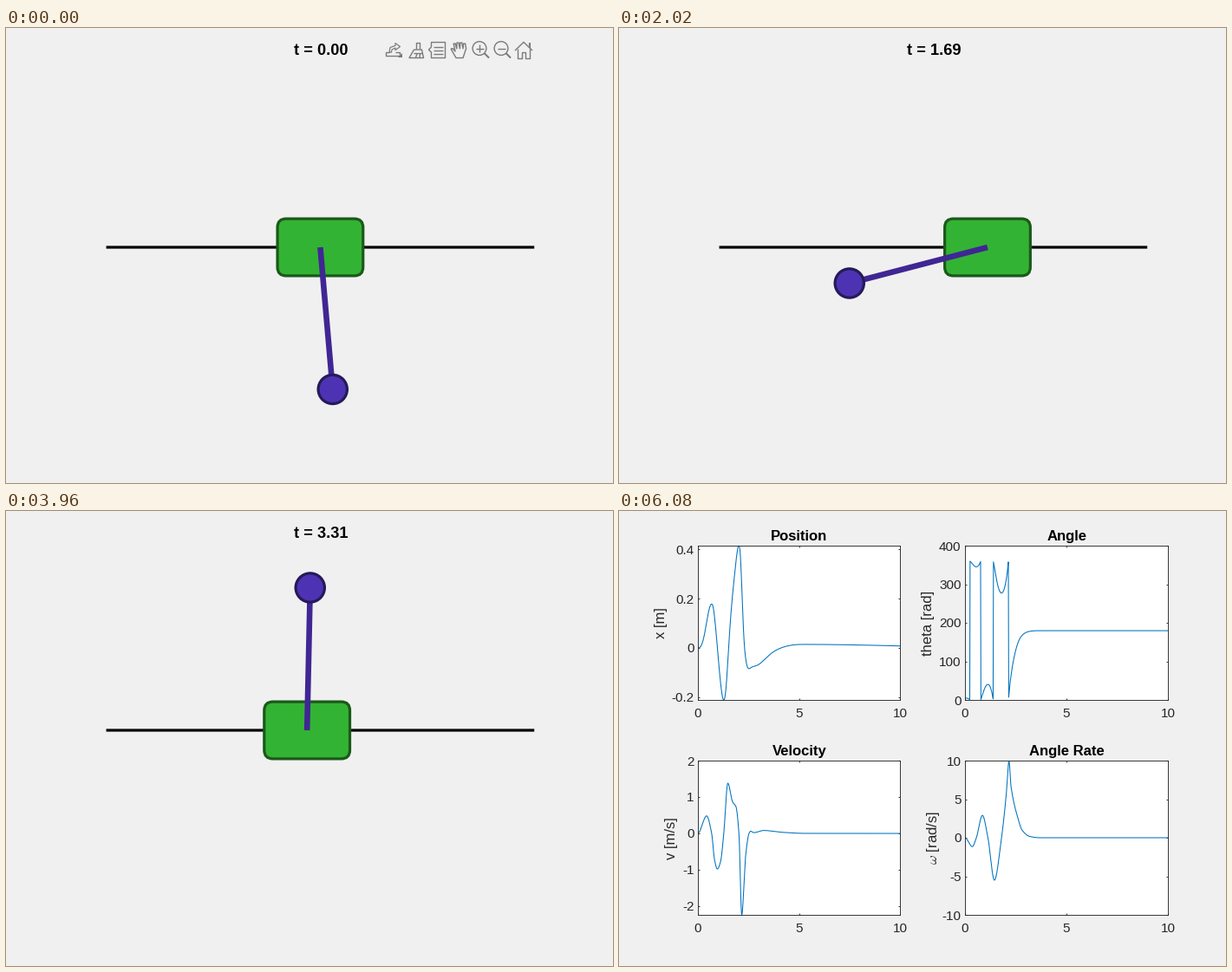
A matplotlib script for the animation above (6.1 s loop, 700 px wide and 525 px high).

```python
import numpy as np
import matplotlib as mpl
import matplotlib.pyplot as plt
from matplotlib.animation import FuncAnimation
from matplotlib.patches import Circle, FancyBboxPatch, Polygon

W, H, DPI = 700, 525, 100
PX = 72 / DPI                  # points per pixel
FRAMES, STEP, DT = 305, 20, 0.0167
SAMPLES, SUB = 599, 10         # ten simulated seconds, sub-steps per sample
TOOLS_UNTIL = 52               # the toolbar is hidden from here on
SCALE, CX, CY = 329.1, 362.4, 253.0
ROD = 0.5 * SCALE
INK, BG, BLUE, TOOL = "#262626", "#f0f0f0", "#0072bd", "#7b7b7b"

mpl.rcParams.update({
    "font.family": "Liberation Sans",
    "mathtext.fontset": "cm",
    "axes.unicode_minus": False,
    "toolbar": "None",
})


# --- motion -----------------------------------------------------------------
def smooth(*keys):
    """Curve through (time, value) keys that never overshoots them."""
    tk, y = np.array(keys).T
    d = np.diff(y) / np.diff(tk)
    m = np.zeros_like(y)
    for k in range(1, len(d)):
        if d[k - 1] * d[k] > 0:
            m[k] = 2 * d[k - 1] * d[k] / (d[k - 1] + d[k])

    def curve(t):
        t = np.clip(t, tk[0], tk[-1])
        i = np.clip(np.searchsorted(tk, t, "right") - 1, 0, len(d) - 1)
        h = tk[i + 1] - tk[i]
        s = (t - tk[i]) / h
        ease = s * s * (3 - 2 * s)
        return (y[i] + (y[i + 1] - y[i]) * ease
                + h * s * (1 - s) * (m[i] * (1 - s) - m[i + 1] * s))
    return curve


def integrate(rate, start):
    dt = DT / SUB
    mid = (np.arange(SAMPLES * SUB) + 0.5) * dt
    return start + np.append(0, np.cumsum(rate(mid)) * dt)[::SUB]


# cart speed in m/s: swing-up strokes, then a slow return to the centre
speed = smooth(
    (0, 0), (0.43, 0.48), (0.68, 0), (0.82, -0.72), (0.96, -0.98),
    (1.12, -0.78), (1.28, 0), (1.48, 1.38), (1.72, 0.86), (1.88, 0.74),
    (2.03, 0), (2.17, -2.24), (2.36, -0.62), (2.53, 0), (2.61, 0.06),
    (2.76, 0.02), (3.25, 0.08), (4.14, 0.03), (5.3, 0), (10, -0.002))

# rod rate in rad/s: growing swings, one big push over the top, decay
spin = smooth(
    (0, 0), (0.36, -1.15), (0.56, 0), (0.86, 2.9), (1.13, 0), (1.45, -5.5),
    (1.8, 0), (2.02, 5.2), (2.17, 9.9), (2.27, 6.6), (2.59, 2.7),
    (2.822, 0.95), (3.2, 0.16), (3.7, 0))

ts = np.arange(SAMPLES + 1) * DT
v, w = speed(ts), spin(ts)
pos = integrate(speed, 0)
angle = integrate(spin, np.radians(5))

# --- stage ------------------------------------------------------------------
fig = plt.figure(figsize=(W / DPI, H / DPI), dpi=DPI, facecolor=BG)
stage = fig.add_axes([0, 0, 1, 1])
stage.set(xlim=(0, W), ylim=(H, 0))
stage.axis("off")


def line(*pts, color=TOOL, lw=1.4, **kw):
    x, y = zip(*pts)
    return stage.plot(x, y, color=color, lw=lw * PX,
                      solid_capstyle="butt", **kw)[0]


def label(x, y, s, size=16.6, **kw):
    return stage.text(x, y, s, fontsize=size * PX, **kw)


cart_w, cart_h, half = 0.3 * SCALE, 0.2 * SCALE, 0.75 * SCALE
track = line((CX - half, CY), (CX + half, CY), color="black", lw=3.2,
             snap=False)
cart = stage.add_patch(FancyBboxPatch(
    (0, CY - cart_h / 2), cart_w, cart_h,
    boxstyle="round,pad=0,rounding_size=10",
    fc=(0.2, 0.7, 0.2), ec=(0.1, 0.35, 0.1), lw=3.2 * PX, zorder=3))
rod = line((0, 0), (0, 0), color=(0.25, 0.15, 0.58), lw=6.6, zorder=4)
bob = stage.add_patch(Circle((0, 0), 0.05 * SCALE + 0.2, fc=(0.3, 0.2, 0.7),
                             ec=(0.15, 0.1, 0.35), lw=3.2 * PX, zorder=5))
clock = label(331.8, 31, "", 18.3, weight="bold", color="black")
scene = [track, cart, rod, bob, clock]


# --- toolbar icons ----------------------------------------------------------
def lens(x):
    ring = Circle((x, 23.5), 7.9, fill=False, ec=TOOL, lw=1.4 * PX)
    return [stage.add_patch(ring),
            line((x + 5.5, 29), (x + 11, 34.5), lw=2),
            line((x - 4.5, 23.5), (x + 4.5, 23.5))]


def hand():
    pts = [(513, 24), (515.3, 23.7), (518, 27)]
    for k in range(4):
        x, tip = 516.2 + 3.8 * k, 16.5 + abs(k - 1.5)
        pts += [(x, tip), (x + 2, tip), (519.8 + 3.6 * k, 23.8)]
    return line(*pts, (527, 34.5), (519, 34.5), (513, 24))


tools = [
    # share
    line((442, 27.5), (437.5, 27.5), (437.5, 31.5), (454, 31.5),
         (454, 27.5), (449, 27.5)),
    line((442, 28), (443, 22.5), (449, 20.3), (449, 17.5), (454.5, 21.5),
         (449, 25.5), (449, 23), (445, 25), (444.5, 28), (442, 28), lw=1.2),
    stage.add_patch(Polygon([(457, 29), (457, 34), (452, 34)], fc=TOOL, lw=0)),
    # brush
    line((473, 24), (473, 16.5), (477, 16.5), (477, 24)),
    line((470.5, 25), (479.5, 25), (481.5, 34.5), (465, 34.5), (470.5, 25)),
    line((470, 29), (480, 29)),
    line((472.5, 34), (474, 30)),
    line((477, 34), (477.5, 30)),
    # note
    line((490.5, 22), (490.5, 16.5), (506.5, 16.5), (506.5, 34.5),
         (490.5, 34.5), (490.5, 28), (487.5, 25), (490.5, 22)),
    *[line((493, y), (503.5, y)) for y in (21.5, 25.5, 29.5)],
    hand(),
    *lens(546), line((546, 19), (546, 28)),
    *lens(571),
    # home
    line((587, 26), (597, 16.3), (607, 26)),
    line((590, 23.5), (590, 34.5), (594.8, 34.5), (594.8, 27.5),
         (599.2, 27.5), (599.2, 34.5), (604, 34.5), (604, 23.5)),
    line((602.5, 21), (602.5, 17), (604, 17), (604, 22.5), lw=1.1),
]

# --- result charts ----------------------------------------------------------
LEFT, RIGHT = (91, 324), (399, 633)
UPPER, LOWER = (40, 218), (288, 466)
charts = []


def chart(col, row, title, ylab, lab_x, data, ylim, ticks):
    (x0, x1), (y0, y1) = col, row
    ax = fig.add_axes([x0 / W, 1 - y1 / H, (x1 - x0) / W, (y1 - y0) / H],
                      facecolor="white")
    ax.plot(ts, data, color=BLUE, lw=1.05 * PX)
    ax.set(xlim=(0, 10), ylim=ylim)
    ax.set_xticks([0, 5, 10])
    ax.set_yticks(ticks, [f"{k:g}" for k in ticks])
    ax.tick_params(direction="in", top=True, right=True, length=2.4 * PX,
                   width=0.9 * PX, color=INK, labelcolor=INK,
                   labelsize=15.2 * PX)
    ax.tick_params(axis="x", pad=9 * PX)
    ax.tick_params(axis="y", pad=4.5 * PX)
    for s in ax.spines.values():
        s.set(linewidth=0.9 * PX, color=INK)
    charts.extend([
        ax,
        label((x0 + x1) / 2 + 0.5, y0 - 6, title, weight="bold", ha="center"),
        label(lab_x, (y0 + y1) / 2 + 0.5, ylab, rotation=90, color=INK,
              ha="center", va="center"),
    ])


chart(LEFT, UPPER, "Position", "x [m]", 48, pos,
      (pos.min(), pos.max()), [-0.2, 0, 0.2, 0.4])
chart(RIGHT, UPPER, "Angle", "theta [rad]", 356, np.degrees(angle) % 360,
      (0, 400), range(0, 401, 100))
chart(LEFT, LOWER, "Velocity", "v [m/s]", 61, v,
      (v.min(), 2), range(-2, 3))
chart(RIGHT, LOWER, "Angle Rate", r"$\omega$ [rad/s]", 362, w,
      (-10, 10), range(-10, 11, 5))


# --- animation --------------------------------------------------------------
def show(group, on):
    for a in group:
        a.set_visible(on)


def update(n):
    done = n == FRAMES - 1
    show(scene, not done)
    show(charts, done)
    show(tools, n < TOOLS_UNTIL)
    x = CX + SCALE * pos[n]
    tip = x + ROD * np.sin(angle[n]), CY + ROD * np.cos(angle[n])
    cart.set_x(x - cart_w / 2)
    rod.set_data([x, tip[0]], [CY, tip[1]])
    bob.center = tip
    clock.set_text(f"t = {ts[n]:.2f}")
    return scene + tools + charts


anim = FuncAnimation(fig, update, frames=FRAMES, interval=STEP,
                     init_func=lambda: update(0), repeat=True, repeat_delay=0)
plt.show()
```
